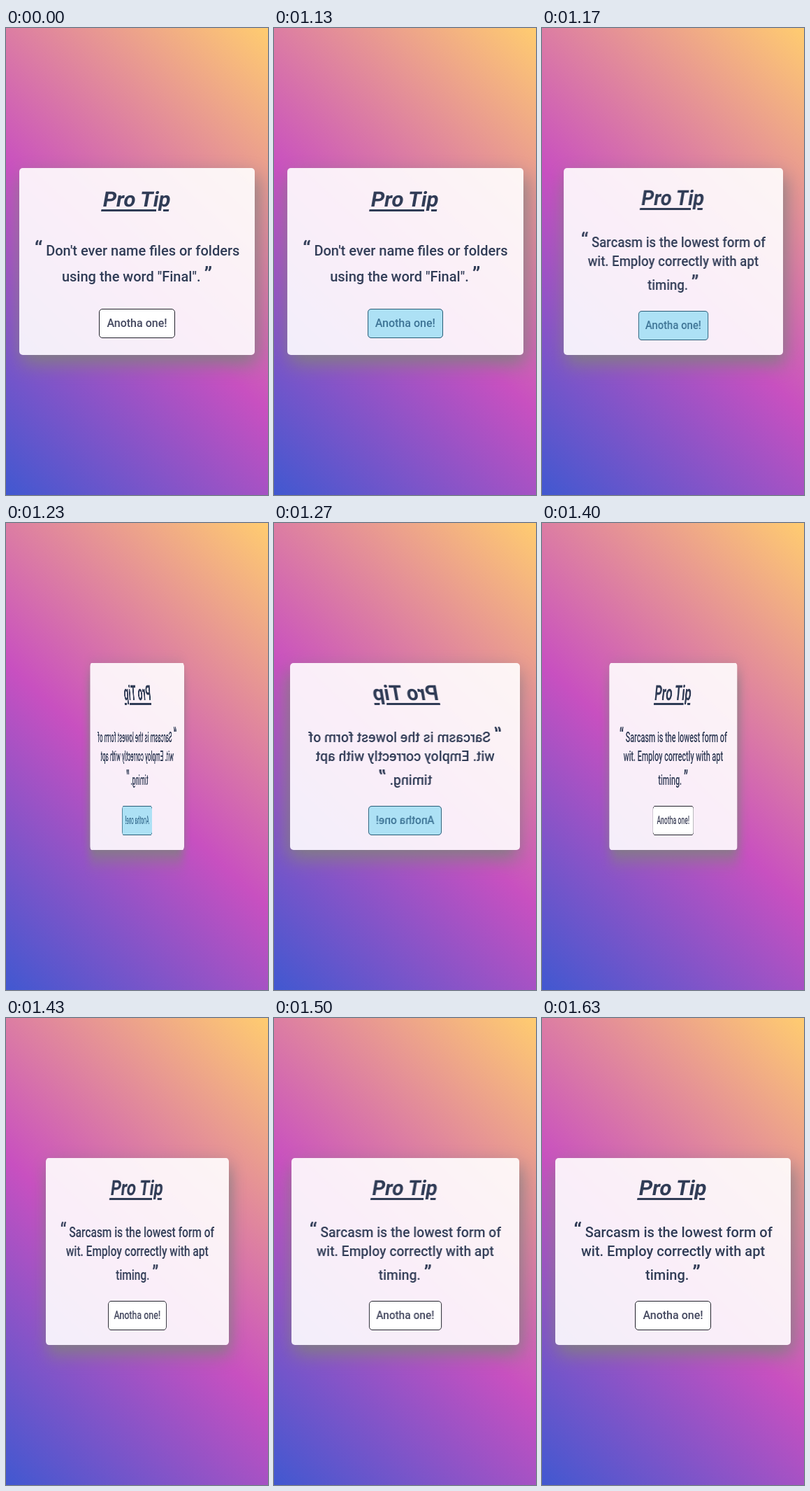
Animation, 375 px wide and 667 px high, one loop 8 s. Source, as an HTML page:

```html
<!DOCTYPE html>
<html lang="en">
<head>
<meta charset="utf-8">
<title>Pro Tip</title>
<style>
  html, body {
    margin: 0;
    width: 100%;
    height: 100%;
    overflow: hidden;
  }
  body {
    background: linear-gradient(43deg, #4158d0 0%, #c850c0 46%, #ffcc70 100%);
    color: #303c56;
    font: 500 20px/28px Roboto, sans-serif;
  }
  .card {
    position: absolute;
    left: 5%;
    top: 30%;
    width: 90%;
    height: 40%;
    border-radius: 5px;
    background: rgba(255, 255, 255, .9);
    box-shadow: 3px 12px 28px gray;
    text-align: center;
    white-space: nowrap;
  }
  .card > *, .tip span {
    position: absolute;
    left: 0;
    right: 0;
    margin: 0 auto;
  }
  h1 {
    top: 27px;
    width: fit-content;
    font: 700 30px/36px Roboto, sans-serif;
    text-decoration: underline 3px;
    text-underline-offset: 4px;
    transform: skewX(-10deg);
  }
  .tip { top: 0; }
  .tip span { top: var(--y); }
  .tip b {
    font-size: 30px;
    font-weight: inherit;
    line-height: 0;
  }
  .button {
    top: 201px;
    width: fit-content;
    padding: 0 10px;
    border: 1px solid #22232c;
    border-radius: 5px;
    background: #fff;
    color: #44485f;
    font-size: 16px;
    line-height: 40px;
  }
  .pressed .button::after {
    content: "";
    position: absolute;
    inset: -1px;
    border-radius: 5px;
    background: rgba(51, 181, 229, .4);
  }
  .card:not(.swapped) .second, .swapped .first { display: none; }
  .swapped h1 { top: 25px; }
  .swapped .button { top: 204px; }
</style>
</head>
<body>
<div class="card">
  <h1>Pro Tip</h1>
  <div class="tip first">
    <span style="--y: 104px"><b>“</b> Don't ever name files or folders</span>
    <span style="--y: 141px">using the word "Final". <b>”</b></span>
  </div>
  <div class="tip second">
    <span style="--y: 92px"><b>“</b> Sarcasm is the lowest form of</span>
    <span style="--y: 119px">wit. Employ correctly with apt</span>
    <span style="--y: 153px">timing. <b>”</b></span>
  </div>
  <div class="button">Anotha one!</div>
</div>
<script>
  const LOOP = 8000, FRAME = 1000 / 30;
  const SPIN_START = 1129, SPIN_TIME = 500;
  const SWAP = 1150, RELEASE = 1285;

  const card = document.querySelector('.card');
  const start = performance.now();

  const bezier = (a, b, u) =>
    3 * a * u * (1 - u) ** 2 + 3 * b * u * u * (1 - u) + u ** 3;

  // Same curve as the CSS "ease" keyword
  function ease(x) {
    if (x <= 0 || x >= 1) return x <= 0 ? 0 : 1;
    let lo = 0, hi = 1;
    for (let i = 0; i < 24; i++) {
      const mid = (lo + hi) / 2;
      if (bezier(.25, .25, mid) < x) lo = mid; else hi = mid;
    }
    return bezier(.1, 1, lo);
  }

  function draw() {
    const time = (performance.now() - start) % LOOP;
    // The motion advances at 30 frames per second
    const t = Math.floor((time + 3.4) / FRAME) * FRAME;
    const turn = ease((t - SPIN_START) / SPIN_TIME);

    card.style.transform =
      turn > 0 && turn < 1 ? `rotateY(${360 * turn}deg)` : 'none';
    card.classList.toggle('swapped', t >= SWAP);
    card.classList.toggle('pressed', t >= SPIN_START && t < RELEASE);
    requestAnimationFrame(draw);
  }
  draw();
</script>
</body>
</html>
```
